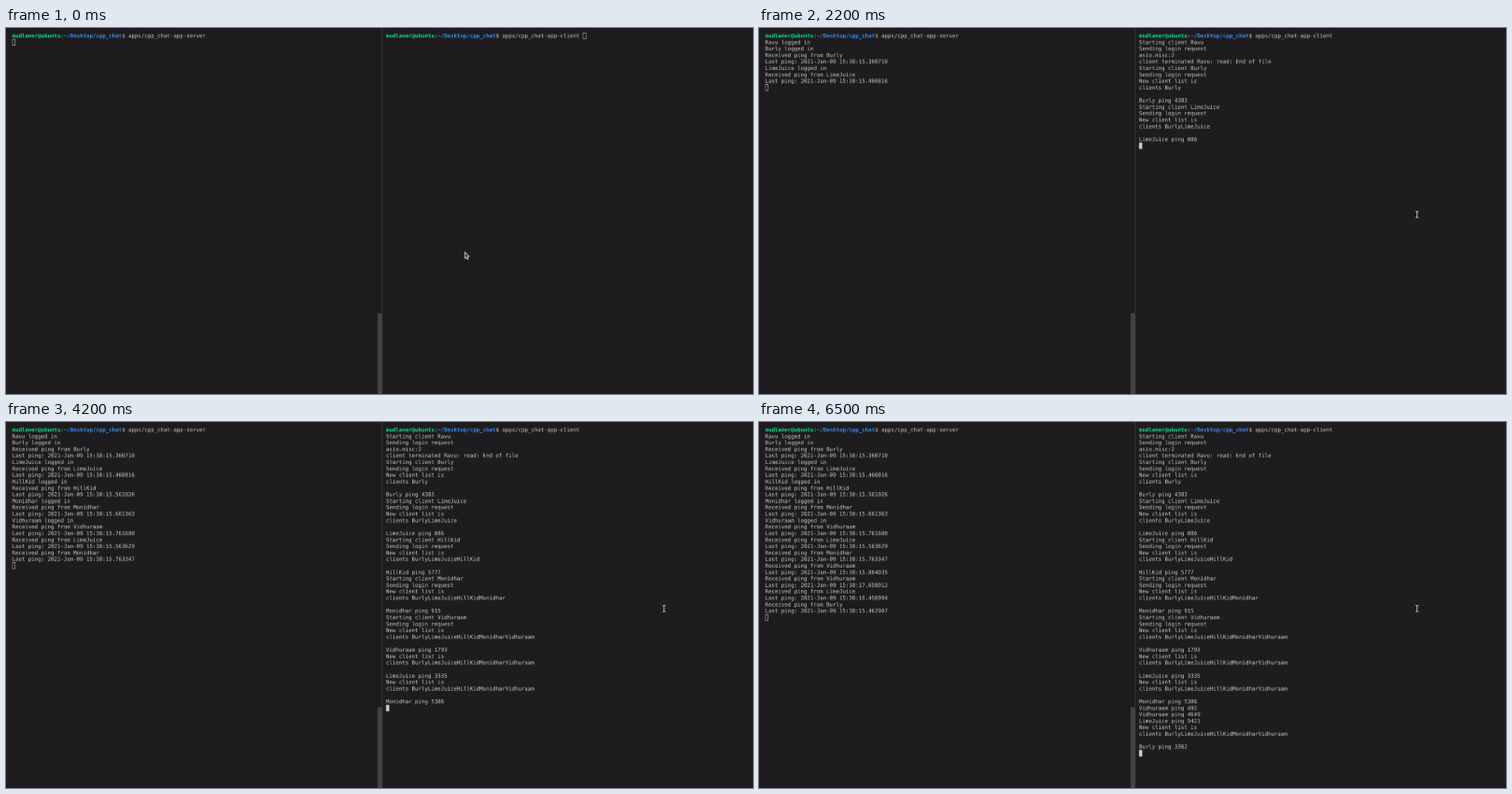
Recreate the animation shown at these times as an HTML page with a canvas. Size 800x392 px, loop 8000 ms.

```html
<!DOCTYPE html>
<html lang="en">
<head>
<meta charset="utf-8">
<title>Chat server and client</title>
<style>
  html, body { margin: 0; width: 100%; height: 100%; overflow: hidden; background: #1e1c1f; }
  canvas { display: block; width: 800px; height: 392px; }
</style>
</head>
<body>
<canvas id="stage" width="800" height="392"></canvas>
<script>
const W = 800, H = 392, LOOP = 8000;
const CELL = 3.457, ROW = 6.925, TOP = 5, BASE = 5.4;
const LEFT = 6.6, RIGHT = 407;
const SIZE = 5.742, SCALE = 2.4;
const FONT = `${SIZE}px "DejaVu Sans Mono", monospace`;
const TEXT = '#cccccc', GREEN = '#12e58b', BLUE = '#3b8eea', BACK = '#1e1c1f';

// time, client, [login | list | ping], server stamp, ping value
const EVENTS = [
  [2100, 'Burly', 'login', '15.360710', 4383],
  [2200, 'LimeJuice', 'login', '15.460816', 886],
  [2300, 'HillKid', 'login', '15.561026', 5777],
  [2400, 'Monidhar', 'login', '15.661363', 915],
  [2500, 'Vidhuraam', 'login', '15.761680', 1793],
  [3100, 'LimeJuice', 'list', '15.563629', 3335],
  [3300, 'Monidhar', 'list', '15.763347', 5386],
  [4300, 'Vidhuraam', 'ping', '15.864035', 492],
  [4800, 'Vidhuraam', 'ping', '17.658012', 4649],
  [6400, 'LimeJuice', 'ping', '16.450994', 5421],
  [6500, 'Burly', 'list', '15.462907', 3362]
];

const view = document.getElementById('stage').getContext('2d');
view.imageSmoothingQuality = 'high';

// Drawn large, then reduced, for soft small type
const sheet = document.createElement('canvas');
sheet.width = W * SCALE;
sheet.height = Math.ceil(H * SCALE);
const ctx = sheet.getContext('2d');

function logs(t) {
  const server = [], client = [];
  if (t < 2000) return { server, client };
  server.push('Ravu logged in');
  client.push('Starting client Ravu', 'Sending login request', 'asio.misc:2',
    'client terminated Ravu: read: End of file');
  let names = '';
  for (const [at, name, kind, stamp, value] of EVENTS) {
    if (t < at) break;
    if (kind === 'login') {
      names += name;
      server.push(`${name} logged in`);
      client.push(`Starting client ${name}`, 'Sending login request');
    }
    if (kind !== 'ping') client.push('New client list is', `clients ${names}`, '');
    server.push(`Received ping from ${name}`, `Last ping: 2021-Jan-09 15:38:${stamp}`);
    client.push(`${name} ping ${value}`);
  }
  return { server, client };
}

function write(str, x, col, row, color = TEXT, bold = false) {
  ctx.font = (bold ? 'bold ' : '') + FONT;
  ctx.fillStyle = color;
  ctx.fillText(str, x + col * CELL, TOP + row * ROW + BASE);
}

function pane(x, command, lines) {
  write('mudlaner@ubuntu', x, 0, 0, GREEN, true);
  write(':', x, 15, 0);
  write('~/Desktop/cpp_chat', x, 16, 0, BLUE, true);
  write('$ ' + command, x, 34, 0);
  lines.forEach((line, i) => write(line, x, 0, i + 1));
}

function caret(x, col, row, solid) {
  const left = x + col * CELL, top = TOP + row * ROW;
  if (solid) {
    ctx.fillStyle = TEXT;
    ctx.fillRect(left, top, CELL, ROW);
  } else {
    ctx.strokeStyle = TEXT;
    ctx.lineWidth = 0.5;
    ctx.strokeRect(left + 0.25, top + 0.25, CELL - 0.5, ROW - 0.5);
  }
}

function arrow(x, y) {
  ctx.beginPath();
  [[0, 0], [0, 6.4], [1.5, 5.1], [2.6, 7.4], [3.6, 6.9], [2.6, 4.7], [4.5, 4.5]]
    .forEach(([dx, dy]) => ctx.lineTo(x + dx, y + dy));
  ctx.closePath();
  ctx.fillStyle = '#151416';
  ctx.fill();
  ctx.strokeStyle = '#e2e2e2';
  ctx.lineWidth = 0.75;
  ctx.stroke();
}

function beam(x, y) {
  ctx.beginPath();
  ctx.moveTo(x - 1.6, y - 3.3);
  ctx.quadraticCurveTo(x, y - 3.3, x, y - 2.4);
  ctx.quadraticCurveTo(x, y - 3.3, x + 1.6, y - 3.3);
  ctx.moveTo(x, y - 2.4);
  ctx.lineTo(x, y + 2.4);
  ctx.moveTo(x - 1.6, y + 3.3);
  ctx.quadraticCurveTo(x, y + 3.3, x, y + 2.4);
  ctx.quadraticCurveTo(x, y + 3.3, x + 1.6, y + 3.3);
  ctx.strokeStyle = '#d8d8d8';
  ctx.lineWidth = 0.8;
  ctx.stroke();
}

function pointer(t) {
  if (t >= 2100) return beam(704.8, 199.8);
  const step = Math.min(5, Math.floor(t / 100)) / 5;
  const p = step * step * (3 - 2 * step);
  arrow(491.5 + 214 * p, 240.2 - 40 * p);
}

function draw(t) {
  ctx.setTransform(SCALE, 0, 0, SCALE, 0, 0);
  ctx.fillStyle = BACK;
  ctx.fillRect(0, 0, W, H + 1);
  ctx.fillStyle = '#434244';
  ctx.fillRect(398, 305.5, 4.5, H);
  ctx.fillStyle = '#414042';
  ctx.fillRect(402.4, 0, 0.8, H + 1);

  const { server, client } = logs(t);
  pane(LEFT, 'apps/cpp_chat-app-server', server);
  pane(RIGHT, 'apps/cpp_chat-app-client', client);
  caret(LEFT, 0, server.length + 1, false);
  if (client.length) caret(RIGHT, 0, client.length + 1, true);
  else caret(RIGHT, 61, 0, t >= 700);
  pointer(t);

  view.drawImage(sheet, 0, 0, W * SCALE, H * SCALE, 0, 0, W, H);
}

const start = performance.now();
function tick() {
  draw((performance.now() - start) % LOOP);
  requestAnimationFrame(tick);
}
tick();
</script>
</body>
</html>
```
